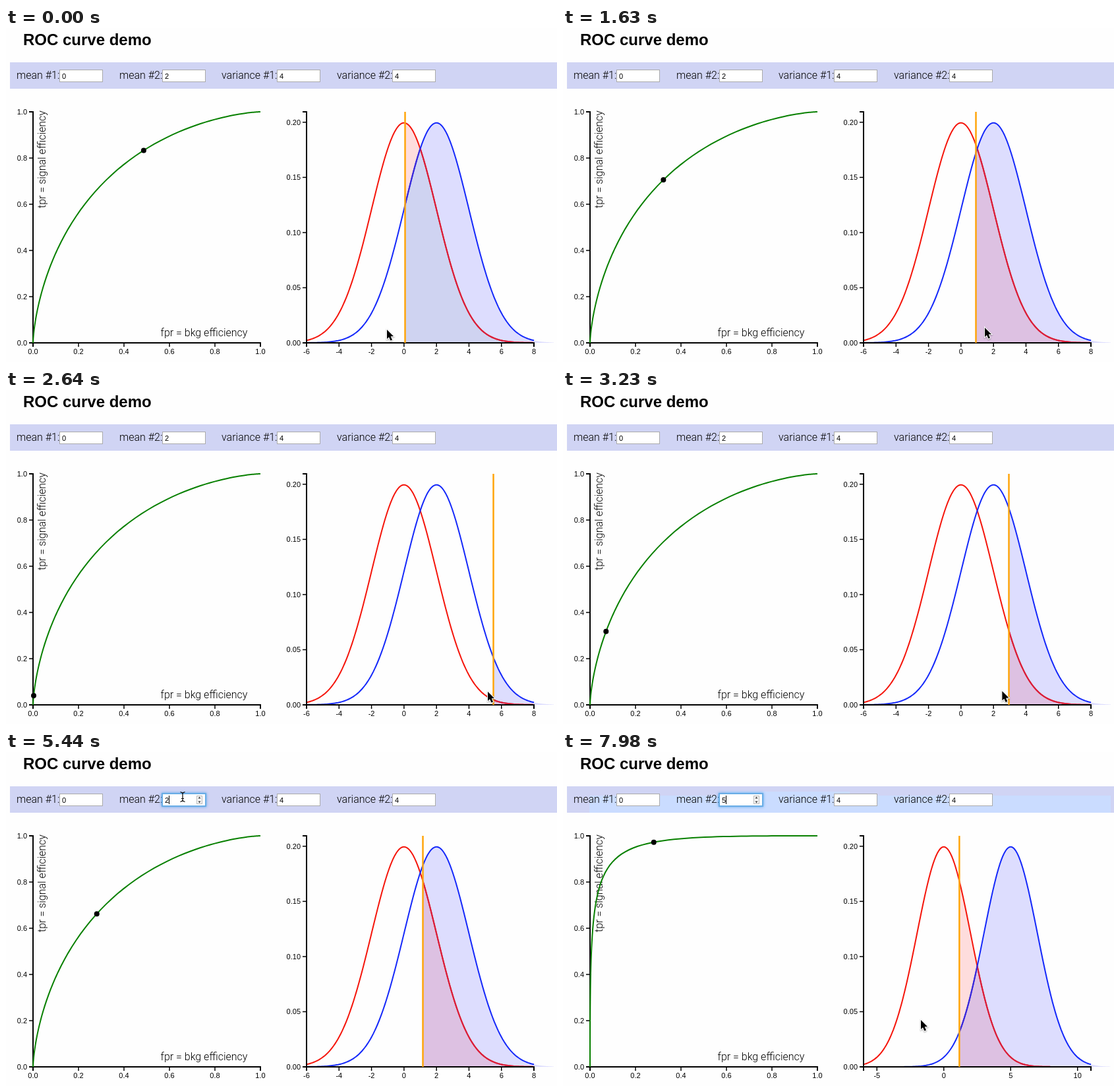
Animation, 836 px wide and 506 px high, one loop 8 s. Source, as an HTML page with a canvas:

```html
<!DOCTYPE html>
<html lang="en">
<head>
<meta charset="utf-8">
<title>ROC curve demo</title>
<style>
  html, body { margin: 0; width: 100%; height: 100%; overflow: hidden; background: #fff; }
  canvas { display: block; }
</style>
</head>
<body>
<canvas id="stage" width="836" height="506"></canvas>
<script>
const ctx = document.getElementById('stage').getContext('2d');
const LOOP = 8000, SIGMA = 2, BOTTOM = 477, TOP = 127, HEIGHT = BOTTOM - TOP;
const ROC_X = 41, PDF_X = 456, WIDTH = 345, LOW = -6;
const LABEL = '300 16px Roboto, sans-serif';
const SMALL = '11px "Liberation Sans", Arial, sans-serif';

// Rows: step, value(s)
const cutKeys = [[0, 605.5], [2, 555], [4, 515], [6, 531.5], [11, 626.5], [14, 730],
  [16, 768], [18, 739.5], [24, 645], [25, 632.5]];
const mouseKeys = [[0, 578, 457], [2, 535, 458], [4, 512, 458], [6, 534, 457], [11, 640, 454],
  [14, 742, 456], [16, 766, 457], [18, 731, 457], [24, 634, 456], [25, 630, 454],
  [28, 630, 454], [32, 229, 73], [33, 268, 68], [51, 268, 68], [52, 285, 75], [54, 543, 406]];

function sample(keys, step) {
  const i = keys.findIndex(k => k[0] > step);
  if (i < 0) return keys[keys.length - 1].slice(1);
  const a = keys[i - 1], b = keys[i], f = (step - a[0]) / (b[0] - a[0]);
  return a.slice(1).map((v, j) => v + (b[j + 1] - v) * f);
}

const pdf = (x, mean) => Math.exp(-((x - mean) ** 2) / (2 * SIGMA ** 2)) / (SIGMA * Math.sqrt(2 * Math.PI));
const PEAK = pdf(0, 0) * 1.05;
const pdfY = v => BOTTOM - v / PEAK * HEIGHT;
// Share of a normal distribution above x
function above(x, mean) {
  const z = (x - mean) / SIGMA;
  return 1 / (1 + Math.exp(1.5976 * z + 0.07056 * z ** 3));
}

function text(str, x, y, font, align = 'left') {
  ctx.font = font;
  ctx.textAlign = align;
  ctx.fillStyle = '#000';
  ctx.fillText(str, x, y);
}

function box(x, y, w, h, color) {
  ctx.fillStyle = color;
  ctx.fillRect(x, y, w, h);
}

function polyline(points, color, width = 2) {
  ctx.beginPath();
  points.forEach(p => ctx.lineTo(...p));
  ctx.strokeStyle = color;
  ctx.lineWidth = width;
  ctx.stroke();
}

function trace(f, from, to, count = 160) {
  return Array.from({ length: count + 1 }, (_, i) => f(from + (to - from) * i / count));
}

function axes(left, xTicks, yTicks) {
  const right = left + WIDTH;
  polyline([[left - 6, TOP], [left, TOP], [left, BOTTOM], [left - 6, BOTTOM]], '#000');
  polyline([[left, BOTTOM + 6], [left, BOTTOM], [right, BOTTOM], [right, BOTTOM + 6]], '#000');
  for (const [x, label] of xTicks) {
    polyline([[x, BOTTOM], [x, BOTTOM + 6]], '#000', 1.5);
    text(label, x, 494, SMALL, 'center');
  }
  for (const [y, label] of yTicks) {
    polyline([[left - 6, y], [left, y]], '#000', 1.5);
    text(label, left - 9, y + 4, SMALL, 'right');
  }
}

function drawForm(time, mean2, step) {
  text('ROC curve demo', 26, 26, 'bold 24px "Liberation Sans", Arial, sans-serif');
  box(6, 52, 830, 40, '#d0d4f4');
  if (time >= 6790) box(40, 66, 791, 26, '#cadcff');
  if (time >= 7690) box(247, 60, 188, 6, '#cadcff');

  const fields = [['mean #1:', 16, 81, 0], ['mean #2:', 172, 237, mean2],
    ['variance #1:', 327, 411, 4], ['variance #2:', 502, 586, 4]];
  fields.forEach(([name, x, inputX, value], i) => {
    const focused = i === 1 && time >= 5000;
    text(name, x, 77, LABEL);
    if (focused) {
      ctx.save();
      ctx.shadowColor = '#5aa5e6';
      ctx.shadowBlur = 4;
      box(inputX - 1, 62, 68, 21, '#69ade6');
      ctx.restore();
    }
    box(inputX, 63, 66, 19, focused ? '#69ade6' : '#aaa');
    box(inputX + 1, 64, 64, 17, '#fff');
    text(value, inputX + 4, 77, SMALL);
    if (i === 1 && step >= 33) drawSpinner();
    if (focused) {
      const lastInput = [6790, 6190, 5890, 5000].find(s => s <= time);
      if ((time - lastInput) % 900 < 450) box(247, 66, 1, 13, '#000');
    }
  });
}

function drawSpinner() {
  box(289, 66, 9, 13, '#bbb');
  box(290, 67, 7, 11, '#f4f4f4');
  ctx.fillStyle = '#444';
  for (const dir of [-1, 1]) {
    ctx.beginPath();
    ctx.moveTo(291.5, 72.5 + dir * 2);
    ctx.lineTo(295.5, 72.5 + dir * 2);
    ctx.lineTo(293.5, 72.5 + dir * 5);
    ctx.fill();
  }
}

function drawRoc(mean2, cut) {
  const point = t => [ROC_X + above(t, 0) * WIDTH, BOTTOM - above(t, mean2) * HEIGHT];
  text('fpr = bkg efficiency', 300.5, 467, LABEL, 'center');
  ctx.save();
  ctx.translate(60, 199);
  ctx.rotate(-Math.PI / 2);
  text('tpr = signal efficiency', 0, 0, LABEL, 'center');
  ctx.restore();

  const ticks = [0, 0.2, 0.4, 0.6, 0.8, 1];
  axes(ROC_X, ticks.map(v => [ROC_X + v * WIDTH, v.toFixed(1)]),
    ticks.map(v => [BOTTOM - v * HEIGHT, v.toFixed(1)]));
  polyline(trace(point, 14, -8), '#088000');
  ctx.beginPath();
  ctx.arc(...point(cut), 4, 0, 7);
  ctx.fillStyle = '#000';
  ctx.fill();
}

function drawDensities(mean2, cut, coolOverlap) {
  const high = mean2 + 3 * SIGMA, unit = WIDTH / (high - LOW);
  const px = x => PDF_X + (x - LOW) * unit;
  const tail = high + 30 / unit, crossing = mean2 / 2;

  function area(f, color) {
    ctx.beginPath();
    ctx.moveTo(px(cut), BOTTOM);
    trace(x => [px(x), pdfY(f(x))], cut, tail).forEach(p => ctx.lineTo(...p));
    ctx.lineTo(px(tail), BOTTOM);
    ctx.fillStyle = color;
    ctx.fill();
  }
  const curve = (mean, from, to, color) =>
    polyline(trace(x => [px(x), pdfY(pdf(x, mean))], from, to), color);

  area(x => pdf(x, 0), 'rgba(255,0,0,.13)');
  area(x => pdf(x, mean2), 'rgba(0,0,255,.13)');
  if (coolOverlap) area(x => Math.min(pdf(x, 0), pdf(x, mean2)), '#cfd3f1');

  curve(0, LOW, high, '#f5140a');
  curve(mean2, LOW, high, '#1428fa');
  // Lines are tinted where the other area covers them
  curve(0, Math.max(cut, crossing), high, '#d81e3c');
  if (cut < crossing) curve(mean2, cut, crossing, '#3c28d8');

  const tickStep = mean2 === 2 ? 2 : 5, xTicks = [];
  for (let v = Math.ceil(LOW / tickStep) * tickStep; v <= high; v += tickStep) xTicks.push([px(v), v]);
  axes(PDF_X, xTicks, [0, 0.05, 0.1, 0.15, 0.2].map(v => [pdfY(v), v.toFixed(2)]));
  polyline([[px(cut), TOP], [px(cut), BOTTOM]], '#ffa50a', 2.5);
}

function drawMouse(x, y) {
  if (x > 237 && x < 303 && y < 82) {
    polyline([[x, y - 6], [x, y + 6]], '#000', 1.2);
    for (const dir of [-1, 1])
      polyline([[x - 3.5, y + dir * 7.5], [x, y + dir * 6], [x + 3.5, y + dir * 7.5]], '#000', 1.2);
    polyline([[x - 2, y + 2.5], [x + 2, y + 2.5]], '#000', 1);
    return;
  }
  ctx.save();
  ctx.translate(x, y);
  ctx.shadowColor = 'rgba(0,0,0,.35)';
  ctx.shadowBlur = 2;
  ctx.shadowOffsetY = 1;
  ctx.beginPath();
  [[0, 0], [0, 14], [3, 11.3], [5.4, 16.6], [8, 15.5], [5.7, 10.3], [10, 10]].forEach(p => ctx.lineTo(...p));
  ctx.closePath();
  ctx.strokeStyle = '#fff';
  ctx.lineWidth = 2;
  ctx.stroke();
  ctx.shadowColor = 'transparent';
  ctx.fillStyle = '#000';
  ctx.fill();
  ctx.restore();
}

function draw(now) {
  const time = now % LOOP, step = Math.floor((time + 10) / 147);
  const mean2 = 2 + [5890, 6190, 6790].filter(s => s <= time).length;
  const cut = LOW + (sample(cutKeys, step)[0] - PDF_X) / WIDTH * 14;
  box(0, 0, 836, 506, '#fefefe');
  drawForm(time, mean2, step);
  drawRoc(mean2, cut);
  drawDensities(mean2, cut, time < 150 || mean2 === 4);
  drawMouse(...sample(mouseKeys, step));
}

let start;
function tick(now) {
  start ??= now;
  draw(now - start);
  requestAnimationFrame(tick);
}
requestAnimationFrame(tick);
</script>
</body>
</html>
```
